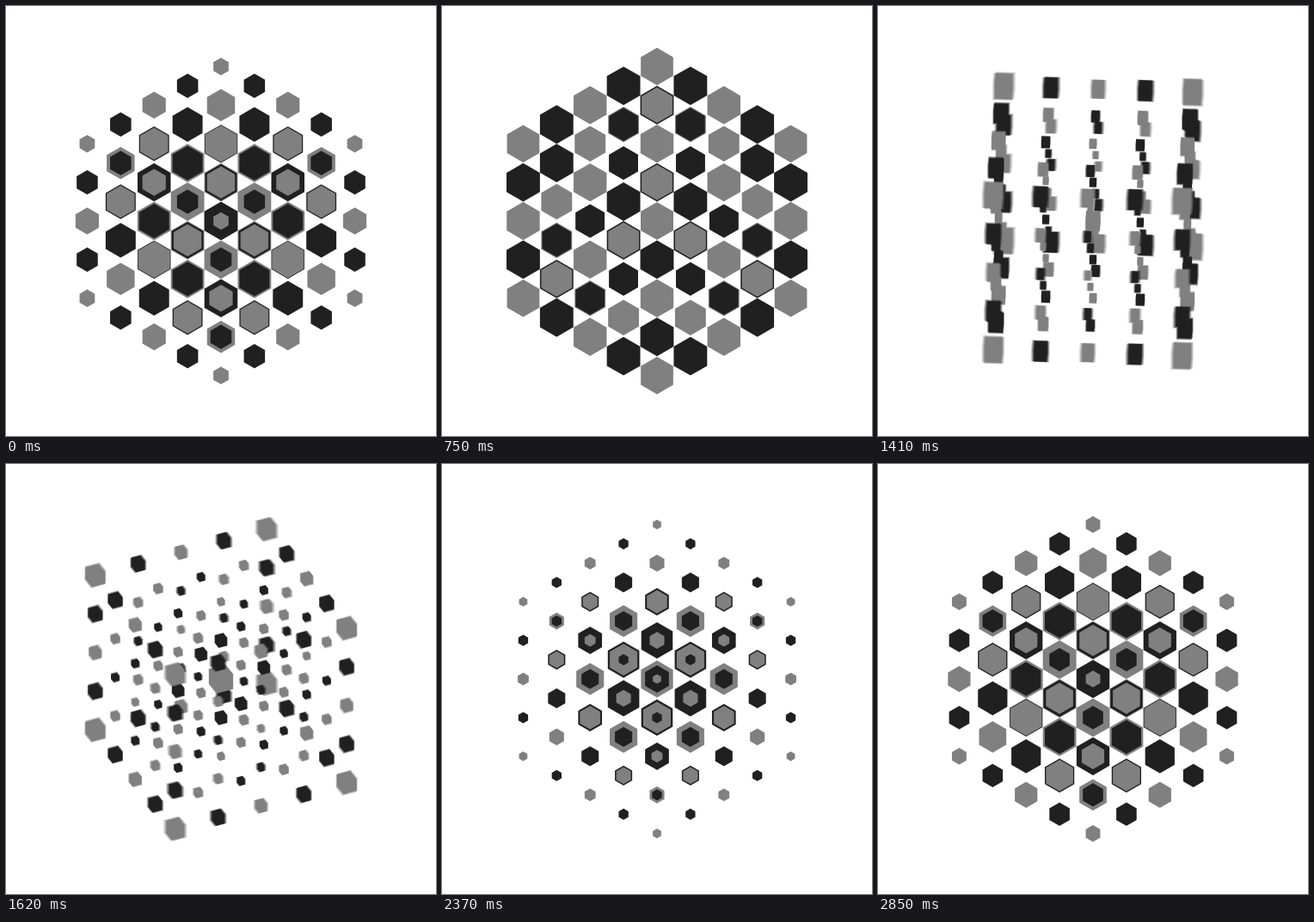
An HTML page with a canvas for the animation above (2880 ms loop, 500 by 500 pixels).

```html
<!DOCTYPE html>
<html lang="en">
<head>
<meta charset="utf-8">
<title>Turning lattice</title>
<style>
  html, body { margin: 0; width: 100%; height: 100%; overflow: hidden; background: #fff; }
  canvas { display: block; width: 500px; height: 500px; }
</style>
</head>
<body>
<canvas id="stage" width="500" height="500"></canvas>
<script>
const SIZE = 500, LOOP = 2880, PITCH = 55;
const SHUTTER = 15, SAMPLES = 6;
const TURN_START = 960, TURN_TIME = 960;
const SIN_E = Math.sqrt(1 / 3), COS_E = Math.sqrt(2 / 3);
const INK = ['#808080', '#202020'];

const ctx = document.getElementById('stage').getContext('2d');
const layer = document.createElement('canvas');
layer.width = layer.height = SIZE;
const pen = layer.getContext('2d');

const cubes = [];
for (let x = -2; x <= 2; x++)
  for (let y = -2; y <= 2; y++)
    for (let z = -2; z <= 2; z++)
      cubes.push({ x, y, z, dist: Math.hypot(x, y, z), ink: INK[Math.abs(x + y + z) % 2] });

// Corners of a cube's outline, as signs along its three axes
const OUTLINE = [[1, -1, -1], [1, 1, -1], [-1, 1, -1], [-1, 1, 1], [-1, -1, 1], [1, -1, 1]];

function turnAt(t) {
  const u = Math.min(1, Math.max(0, (t - TURN_START) / TURN_TIME));
  return Math.PI / 4 + Math.PI / 2 * u * u * (3 - 2 * u);
}

function edgeAt(t, dist) {
  const wave = Math.cos(2 * Math.PI * (t / LOOP - 0.75) - dist * Math.PI / 3);
  return PITCH * (0.3125 + 0.1875 * wave);
}

// Spin about the upright axis, then look down from the isometric height
function project(x, y, z, c, s) {
  const p = x * c + y * s, q = y * c - x * s;
  return { x: p, y: q * SIN_E - z * COS_E, depth: q * COS_E + z * SIN_E };
}

function drawScene(t) {
  const a = turnAt(t), c = Math.cos(a), s = Math.sin(a);
  const axes = [[1, 0, 0], [0, 1, 0], [0, 0, 1]].map(v => {
    const d = project(...v, c, s), sign = d.depth < 0 ? -1 : 1;
    return { x: d.x * sign, y: d.y * sign };
  });
  const corners = OUTLINE.map(k => ({
    x: k[0] * axes[0].x + k[1] * axes[1].x + k[2] * axes[2].x,
    y: k[0] * axes[0].y + k[1] * axes[1].y + k[2] * axes[2].y
  }));

  pen.fillStyle = '#fff';
  pen.fillRect(0, 0, SIZE, SIZE);
  cubes
    .map(cube => ({ cube, at: project(cube.x, cube.y, cube.z, c, s) }))
    .sort((m, n) => m.at.depth - n.at.depth)
    .forEach(({ cube, at }) => {
      const half = edgeAt(t, cube.dist) / 2;
      const cx = SIZE / 2 + at.x * PITCH, cy = SIZE / 2 + at.y * PITCH;
      pen.fillStyle = cube.ink;
      pen.beginPath();
      for (const k of corners) pen.lineTo(cx + k.x * half, cy + k.y * half);
      pen.fill();
    });
}

// Average a few moments for a soft motion blur
function render(t) {
  for (let i = 0; i < SAMPLES; i++) {
    drawScene((t + SHUTTER * i / SAMPLES) % LOOP);
    ctx.globalAlpha = 1 / (i + 1);
    ctx.drawImage(layer, 0, 0);
  }
}

const start = performance.now();
function tick() {
  render((performance.now() - start) % LOOP);
  requestAnimationFrame(tick);
}
tick();
</script>
</body>
</html>
```
